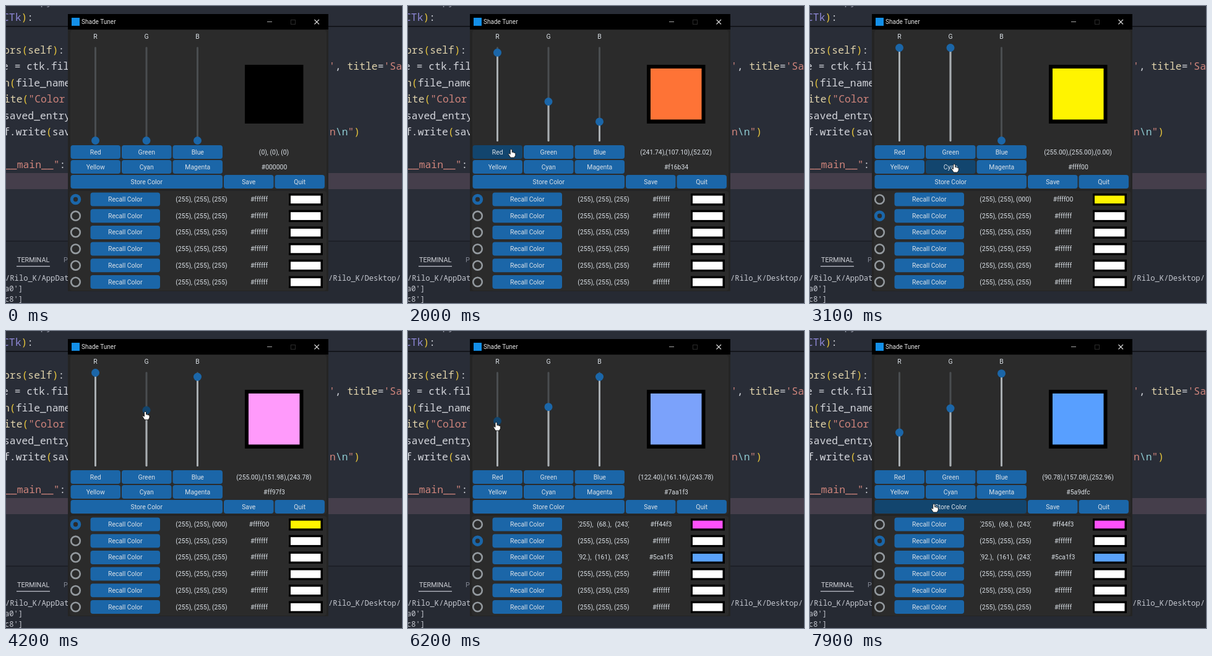
Animation, 640 px wide and 480 px high, one loop 8 s. Source, as an HTML page with a canvas:

```html
<!DOCTYPE html>
<html lang="en">
<head>
<meta charset="utf-8">
<title>RGB sliders</title>
<style>
html, body { margin: 0; width: 100%; height: 100%; overflow: hidden; background: #292d37; }
canvas { display: block; width: 100vw; height: 100vh; }
</style>
</head>
<body>
<canvas id="stage" width="640" height="480"></canvas>
<script>
const ctx = document.getElementById('stage').getContext('2d');
const LOOP = 8000, STEP = 100, CURSOR_SHOWS = 3;
const UI = 'Roboto, sans-serif', MONO = '"Noto Sans Mono", monospace';
const BLUE = '#1b66a8', DARK_BLUE = '#12456e', PALE = '#dce2e8';
const WHITE = '#d4d6dc', CREAM = '#e0d3ac', GOLD = '#e8c63c', RED = '#d0857c';
const TEAL = '#8fcbd2', VIOLET = '#8f88d8';

const presets = {
  Red: [255, 0, 0], Green: [0, 255, 0], Blue: [0, 0, 255],
  Yellow: [255, 255, 0], Cyan: [0, 255, 255], Magenta: [255, 0, 255]
};

const rowY = i => 312.5 + i * 26.7;
const sliderX = i => 144.5 + i * 82.5;
const knobY = value => 217.5 - value / 255 * 150;

const buttons = Object.keys(presets).map((text, i) => (
  { text, x: 104.5 + i % 3 * 82.5, y: i < 3 ? 225 : 249, w: 80.5 }
));
buttons.push(
  { text: 'Store Color', x: 104.5, y: 273, w: 245.5 },
  { text: 'Save', x: 352, y: 273, w: 80.5 },
  { text: 'Quit', x: 434.5, y: 273, w: 80.5 }
);
for (let i = 0; i < 6; i++) {
  buttons.push({ text: 'Recall Color', x: 136.5, y: rowY(i) - 11, w: 112.5 });
}

// Times count in steps; the cursor reaches a widget one step before it clicks.
const drag = (channel, start, end, value) =>
  ({ channel: 'RGB'.indexOf(channel), start, end, value });
const click = (text, end, dx = 6) => {
  const b = buttons.find(button => button.text === text);
  return { text, start: end - 1, end, x: b.x + b.w / 2 + dx, y: b.y + 6.5 };
};
const pick = (slot, end) => ({ slot, start: end - 1, end, x: 112, y: rowY(slot) - 2 });

const actions = [
  drag('R', 5, 12, 241.74), drag('G', 13, 15, 107.1), drag('B', 16, 18, 52.02),
  click('Red', 21, 22), click('Green', 23), click('Blue', 25), click('Yellow', 27),
  click('Store Color', 30), click('Cyan', 32), click('Magenta', 34),
  drag('B', 36, 38, 243.78), pick(0, 40),
  drag('G', 41, 42, 151.98), drag('G', 42, 45, 68.34), click('Store Color', 47), pick(2, 49),
  drag('R', 50, 52, 92.82), drag('G', 53, 54, 69.36), drag('G', 54, 56, 161.16),
  click('Store Color', 58), pick(1, 60),
  drag('R', 61, 63, 150.96), drag('B', 64, 65, 32.64), drag('G', 67, 69, 155.04),
  drag('G', 69, 70, 157.08), drag('R', 71, 72, 90.78), drag('B', 73, 74, 255),
  drag('B', 74, 75, 252.96), click('Store Color', 80, -27)
];

const lerp = (a, b, k) => a + (b - a) * k;
const snap = v => Math.round(v / 1.02) * 1.02;
const whole = v => Math.floor(v + 1e-6);
const hex = rgb => '#' + rgb.map(v => whole(v).toString(16).padStart(2, '0')).join('');
const brief = rgb => rgb.map(v => `(${v ? v.toFixed(2).slice(0, 3) : '000'})`).join(', ');

function shade(rgb) {
  const sum = rgb[0] + rgb[1] + rgb[2];
  if (sum === 0 || sum === 765) return hex(rgb);
  const [r, g, b] = rgb;
  return `rgb(${r * 1.1 - 12}, ${g * 0.87 + 22}, ${b * 1.03})`;
}

function apply(action, state) {
  if ('slot' in action) state.slot = action.slot;
  else if (action.text in presets) state.rgb = [...presets[action.text]];
  else if (action.text === 'Store Color') state.saved[state.slot++] = [...state.rgb];
}

// Plays the actions up to time t and returns the resulting state.
function replay(t) {
  const state = {
    rgb: [0, 0, 0], saved: Array(6).fill([255, 255, 255]), slot: 0, x: 200, y: 240
  };
  let free = CURSOR_SHOWS;
  for (const action of actions) {
    const { channel, start, end, value } = action;
    const isDrag = channel !== undefined;
    const from = isDrag ? state.rgb[channel] : 0;
    const x = isDrag ? sliderX(channel) - 2 : action.x;
    const y = isDrag ? knobY(from) + 2 : action.y;
    if (t < start) {
      const k = (t - free) / (start - free);
      state.x = lerp(state.x, x, k);
      state.y = lerp(state.y, y, k);
      break;
    }
    state.x = x;
    state.y = y;
    if (isDrag) {
      state.rgb[channel] = snap(lerp(from, value, Math.min(1, (t - start) / (end - start))));
      state.y = knobY(state.rgb[channel]) + 2;
    }
    if (t < end) break;
    apply(action, state);
    free = end;
  }
  return state;
}

function rect(x, y, w, h, color) {
  ctx.fillStyle = color;
  ctx.fillRect(x, y, w, h);
}
function round(x, y, w, h, r, color) {
  ctx.fillStyle = color;
  ctx.beginPath();
  ctx.roundRect(x, y, w, h, r);
  ctx.fill();
}
function disc(x, y, r, color) {
  ctx.fillStyle = color;
  ctx.beginPath();
  ctx.arc(x, y, r, 0, 7);
  ctx.fill();
}
function line(x1, y1, x2, y2, color) {
  ctx.strokeStyle = color;
  ctx.lineWidth = 1.1;
  ctx.beginPath();
  ctx.moveTo(x1, y1);
  ctx.lineTo(x2, y2);
  ctx.stroke();
}
function label(text, x, y, color = PALE, size = 10.4, align = 'center', family = UI) {
  ctx.font = `${size}px ${family}`;
  ctx.textAlign = align;
  ctx.fillStyle = color;
  ctx.fillText(text, x, y + 0.5);
}
function code(x, y, ...parts) {
  for (const [text, color] of parts) {
    label(text, x, y, color, 16.4, 'left', MONO);
    x += ctx.measureText(text).width;
  }
}

function drawEditor() {
  rect(0, 0, 640, 480, '#292d37');
  rect(0, 32, 640, 2, '#14161c');
  rect(0, 270, 640, 26, '#453e4b');
  rect(0, 380, 640, 100, '#262a33');
  rect(0, 379, 640, 2, '#1d2028');
  code(26, -7, ['numpy', '#8c8f9c']);
  code(-5, 19, ['CTk', VIOLET], [')', GOLD], [':', WHITE]);
  code(-4, 72, ['ors', CREAM], ['(', GOLD], ['self', CREAM], [')', GOLD], [':', WHITE]);
  code(-6, 98, ['e = ctk.fil', WHITE]);
  code(-4, 125, ['n', CREAM], ['(', GOLD], ['file_name', WHITE]);
  code(-3, 151, ['ite', CREAM], ['(', GOLD], ['"Color', RED]);
  code(-4, 178, ['saved_entry', WHITE]);
  code(-4, 204, ['f.write', WHITE], ['(', GOLD], ['sav', WHITE]);
  code(-2, 257, ['__main__"', RED], [':', WHITE]);
  code(522, 98, ["'", RED], [', ', WHITE], ['title', CREAM], ['=', WHITE], ["'Sa", RED]);
  code(523, 204, ['n', RED], ['\\n', TEAL], ['"', RED], [')', GOLD]);

  label('TERMINAL', 18, 410, '#d0d2d8', 10.8, 'left');
  label('PORTS', 93, 410, '#868a96', 10.8, 'left');
  rect(17, 420, 54, 1.3, '#b9bcc6');
  const shell = (text, x, y) => label(text, x, y, '#c5c8d0', 12.2, 'left', MONO);
  shell('/Rilo_K/AppData', -1, 440);
  shell('/Rilo_K/Desktop/', 521, 440);
  shell("a0']", -2, 457);
  shell("c8']", -2, 474);
}

function drawWindow() {
  rect(100, 13, 421, 448, '#242424');
  rect(100, 13, 421, 25, '#000');
  round(104, 39, 414, 257, 4, '#2b2b2b');
  round(103, 299, 415, 161, 4, '#2b2b2b');
  rect(106, 19, 13, 13, '#138fe8');
  label('Shade Tuner', 122, 25.5, '#e4e4e4', 10, 'left');
  line(422, 25.5, 430, 25.5, '#9a9a9a');
  ctx.strokeStyle = '#292929';
  ctx.strokeRect(460.5, 22.5, 7, 7);
  line(498.5, 22, 506, 29.5, '#dedede');
  line(506, 22, 498.5, 29.5, '#dedede');
}

function drawSlider(i, value, hover) {
  const x = sliderX(i), y = knobY(value);
  label('RGB'[i], x, 49.5);
  round(x - 1.5, 66, 3, 153, 1.5, '#4a4d50');
  round(x - 1.5, y, 3, 219 - y, 1.5, '#a9aeb2');
  disc(x, y, 6.5, hover ? DARK_BLUE : BLUE);
}

function drawRow(i, rgb, selected) {
  const y = rowY(i), text = brief(rgb);
  ctx.strokeStyle = selected ? BLUE : '#949a9f';
  ctx.lineWidth = selected ? 5 : 2.6;
  ctx.beginPath();
  ctx.arc(112.5, y, selected ? 6.2 : 7.3, 0, 7);
  ctx.stroke();

  ctx.save();
  ctx.beginPath();
  ctx.rect(275, y - 9, 82, 18);
  ctx.clip();
  if (text.includes('.')) ctx.wordSpacing = '3px';
  label(text, 316, y);
  ctx.restore();

  label(hex(rgb), 409, y);
  rect(457, y - 9.5, 55, 19.5, '#000');
  rect(460, y - 6, 48.5, 12.7, shade(rgb));
}

function drawCursor(x, y, hand) {
  const path = new Path2D(hand
    ? 'M-1.5 1Q0 -1 1.5 1V5Q3 4 4 5.5Q6 5 7 7V10L5 13.5H-1L-4.5 8Q-3.5 6 -1.5 8Z'
    : 'M0 0V12L3 9.5L5 14L7 13L5 8.8H8.8Z');
  ctx.save();
  ctx.translate(x, y);
  ctx.fillStyle = '#fff';
  ctx.strokeStyle = '#111';
  ctx.lineWidth = 0.9;
  ctx.lineJoin = 'round';
  ctx.fill(path);
  ctx.stroke(path);
  ctx.restore();
}

function draw(t) {
  const { rgb, saved, slot, x, y } = replay(t);
  const shown = t >= CURSOR_SHOWS;
  const inside = (left, top, w, h) =>
    shown && x >= left && x <= left + w && y >= top && y <= top + h;
  let hand = inside(103, 302, 18, 154);

  ctx.textBaseline = 'middle';
  drawEditor();
  drawWindow();
  rgb.forEach((value, i) => {
    const hover = inside(sliderX(i) - 8, 60, 16, 163);
    hand = hand || hover;
    drawSlider(i, value, hover);
  });
  for (const b of buttons) {
    const hover = inside(b.x, b.y, b.w, 22);
    hand = hand || hover;
    round(b.x, b.y, b.w, 22, 4, hover ? DARK_BLUE : BLUE);
    label(b.text, b.x + b.w / 2, b.y + 11);
  }

  rect(386, 95, 94.5, 95, '#000');
  rect(392, 101, 82.5, 82.5, shade(rgb));
  const untouched = rgb.every(v => v === 0);
  label(untouched ? '(0), (0), (0)' : rgb.map(v => `(${v.toFixed(2)})`).join(','), 433, 236.5);
  label(hex(rgb), 433.5, 260);

  saved.forEach((color, i) => drawRow(i, color, i === slot));
  if (shown) drawCursor(x, y, hand);
}

const start = performance.now();
function tick() {
  draw(Math.floor((performance.now() - start) % LOOP / STEP));
  requestAnimationFrame(tick);
}
tick();
</script>
</body>
</html>
```
